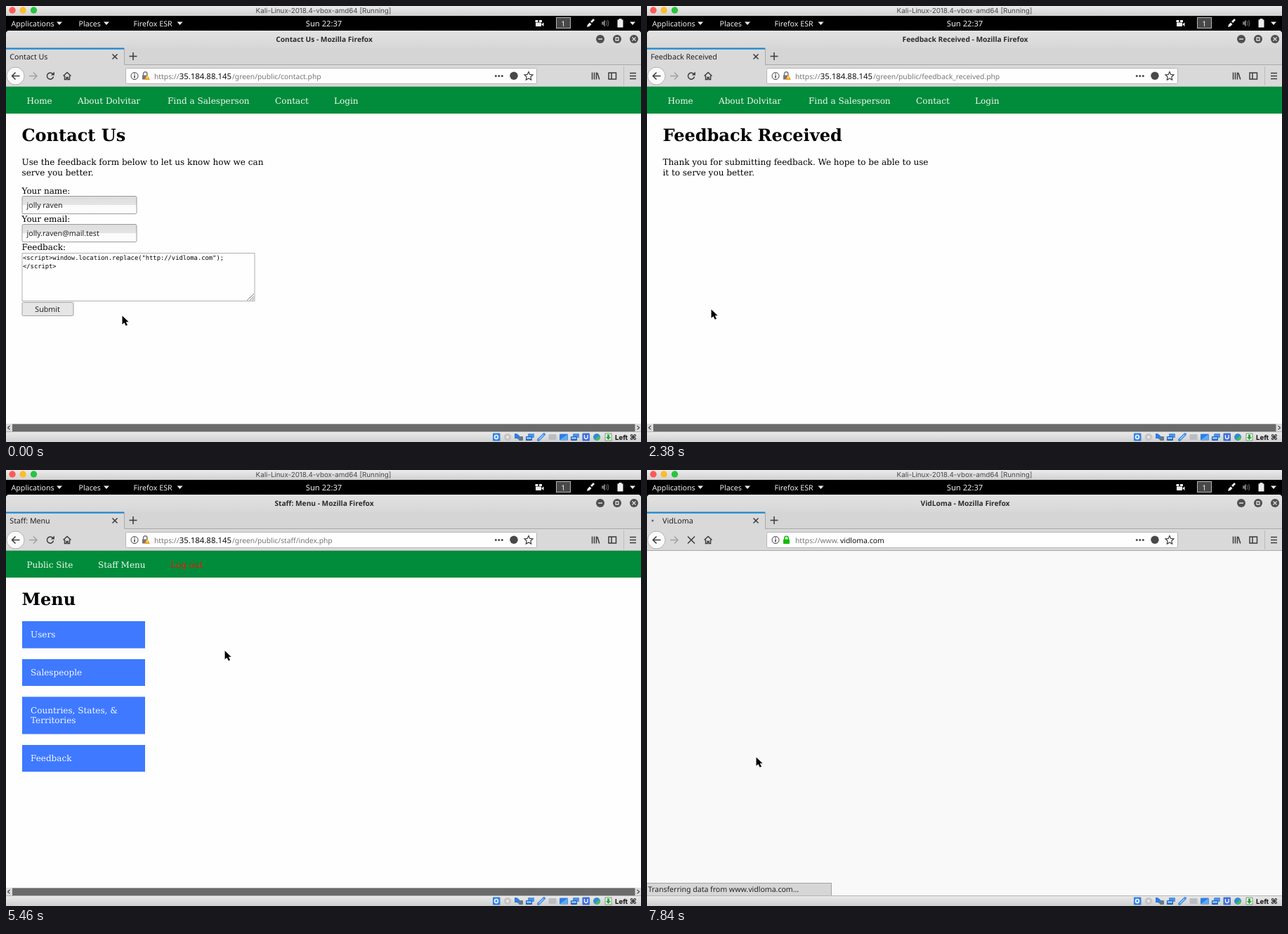
An HTML page for the animation above (7990 ms loop, 904x620 px).

```html
<!DOCTYPE html>
<html lang="en">
<head>
<meta charset="utf-8">
<title>Feedback form session</title>
<style>
  html, body { margin: 0; width: 100%; height: 100%; overflow: hidden; background: #fefefe; }
  svg { position: absolute; left: 0; top: 0; display: block; }
  text, #status { white-space: pre; text-rendering: geometricPrecision; }
  .ui { font: 10.65px "Noto Sans", "Open Sans", sans-serif; fill: #222; }
  .top { fill: #eee; }
  .title { font-size: 10.2px; font-weight: 700; fill: #2b2b2b; }
  .url { font-size: 10.3px; fill: #777; }
  .url .host { fill: #111; }
  .serif { font: 12.03px "DejaVu Serif", serif; fill: #000; }
  .head { font: bold 24px "DejaVu Serif", serif; }
  .nav { fill: #f1f7f3; }
  .mono { font: 8.8px "DejaVu Sans Mono", monospace; fill: #000; }
  .line { fill: none; stroke: #3c3c3c; stroke-width: 1.5; }
  .item rect { fill: #3e79ff; }
  .item.hover rect { fill: #2f6de8; }
  .item text { fill: #f4f7ff; }
  .off { display: none; }
  #status {
    position: absolute; left: 0; top: 587px; height: 17px;
    padding: 0 3.5px 0 1.5px; border: solid #a3a3a3; border-width: 1px 1px 0 0;
    background: #d6d6d6; color: #222; overflow: hidden;
    font: 10.55px/18px "Noto Sans", "Open Sans", sans-serif;
  }
</style>
</head>
<body>
<svg width="904" height="620" viewBox="0 0 904 620">
  <defs>
    <linearGradient id="mac" x2="0" y2="1"><stop stop-color="#ebebeb"/><stop offset="1" stop-color="#cfcfcf"/></linearGradient>
    <linearGradient id="bar" x2="0" y2="1"><stop stop-color="#e2e2e2"/><stop offset="1" stop-color="#d7d7d7"/></linearGradient>
    <linearGradient id="field" x2="0" y2="1"><stop offset=".05" stop-color="#dedede"/><stop offset=".48" stop-color="#e4e4e4"/><stop offset=".5" stop-color="#fafafa"/><stop offset="1" stop-color="#fefefe"/></linearGradient>
  </defs>

  <!-- host window title -->
  <rect width="904" height="15" fill="url(#mac)"/>
  <circle cx="9" cy="6" r="4.7" fill="#fc5b55"/>
  <circle cx="24" cy="6" r="4.7" fill="#fdbb2d"/>
  <circle cx="39.5" cy="6" r="4.7" fill="#27c63f"/>
  <text x="452" y="10" text-anchor="middle" font-family="Inter, sans-serif" font-size="9.8" fill="#484848">Kali-Linux-2018.4-vbox-amd64 [Running]</text>

  <!-- desktop panel -->
  <rect y="14" width="904" height="26" fill="#000"/>
  <g class="ui top">
    <text x="7.5" y="29">Applications</text>
    <text x="103.5" y="29">Places</text>
    <text x="181.5" y="29">Firefox ESR</text>
    <text x="426.8" y="29" font-size="11.2">Sun 22:37</text>
    <path d="M72 22.5h8l-4 4.5zM139 22.5h8l-4 4.5zM243.5 22.5h8l-4 4.5zM888 22.5h8l-4 4.5z"/>
    <path d="M754 23.5h8v5.5h-8zM762 26l3.5-2.500v5.500zM753.5 20h4v3h-4zM759 20h4v3h-4z"/>
    <rect x="783.5" y="16.5" width="20" height="15" fill="#484848" stroke="#b5b5b5"/>
    <text x="790.3" y="29">1</text>
    <path d="M827 30l1-3.5 3-3 2.5 2.5-3 3zM832 22l4-4 2 2-4 4z"/>
    <path d="M848 22.5h2l3-3v10l-3-3h-2z" fill="#777"/>
    <path d="M854.5 21.5q2 3 0 6M856.5 20q3 4.5 0 9" fill="none" stroke="#777"/>
    <path d="M870.5 19.5h2V18h4v1.5h2v11h-8z"/>
  </g>

  <!-- browser frame -->
  <path d="M0 115V40q0-5 5-5h894q5 0 5 5v75z" fill="#d9d9d9"/>
  <path d="M0 60V40q0-5 5-5h894q5 0 5 5v20z" fill="url(#bar)"/>
  <rect x="168" y="60" width="736" height="24" fill="#d5d5d5"/>
  <path d="M168.5 60v23.5H904M0 114.5h904" fill="none" stroke="#a9a9a9"/>
  <rect y="59.5" width="168" height="2.2" fill="#1688d1"/>
  <text id="title" class="ui title" x="453" y="50.5" text-anchor="middle"></text>
  <g fill="#505050">
    <circle cx="846" cy="47" r="6"/><circle cx="870" cy="47" r="6"/><circle cx="894" cy="47" r="6"/>
  </g>
  <path d="M843 47h6M868 45h4v4h-4zM891.5 44.5l5 5m0-5l-5 5" fill="none" stroke="#ddd" stroke-width="1.3"/>
  <circle id="dot" cy="72" r="1.5" fill="#666"/>
  <text id="tab" class="ui" y="76"></text>
  <path class="line" d="M151.5 68.500l7 7m0-7l-7 7M175.5 71.5h11M181 66v11"/>

  <circle cx="13.5" cy="99.5" r="12.5" fill="#fafafa" stroke="#b2b2b2"/>
  <path class="line" d="M19.5 99.5H8.5m5-5l-5 5 5 5"/>
  <path class="line" d="M33 99.5h11m-5-5l5 5-5 5" style="stroke:#a2a2a2"/>
  <g data-icon="reload"><path class="line" d="M66.5 96.5a4.6 4.6 0 1 0 1 4"/><path d="M68.8 93.5v5h-5z" fill="#3c3c3c"/></g>
  <path data-icon="ring" class="line" d="M60 103.3a4.6 4.6 0 1 1 6 0"/>
  <path data-icon="stop" class="line" d="M58 94.5l10 10m0-10l-10 10"/>
  <path class="line" d="M81.5 99.5l5.5-5 5.5 5M83.5 99v5.5h2.5v-3h2v3h2.5V99"/>

  <rect x="170.5" y="88.5" width="585" height="22" rx="2" fill="#fefefe" stroke="#b5b5b5"/>
  <circle cx="183" cy="99.5" r="5" class="line" style="stroke-width:1"/>
  <path class="line" d="M183 98.5v4M183 96v1.3"/>
  <g id="plainLock">
    <path class="line" d="M195.5 99v-2.5a2.7 2.7 0 0 1 5.4 0V99" style="stroke:#777"/>
    <rect x="194" y="98.5" width="8" height="6" fill="#777"/>
    <path d="M201 97.5l4 7.5h-8z" fill="#f2a31b"/><path d="M201 100v3" stroke="#fff"/>
  </g>
  <g id="greenLock">
    <path class="line" d="M195.8 99v-2a2.7 2.7 0 0 1 5.4 0v2" style="stroke:#12bc00"/>
    <rect x="194" y="98.5" width="9" height="6.5" rx="1" fill="#12bc00"/>
  </g>
  <text class="ui url" x="211" y="103.5" id="scheme"></text>
  <text class="ui url" y="103.5"><tspan class="host" id="host"></tspan></text>
  <text class="ui url" x="322" y="103.5" id="path"></text>
  <g fill="#484848">
    <circle cx="697.3" cy="99.5" r="1.5"/><circle cx="701.8" cy="99.5" r="1.5"/><circle cx="706.3" cy="99.5" r="1.5"/>
    <circle cx="723" cy="99.3" r="5.7"/>
  </g>
  <polygon class="line" style="stroke-width:1.2" points="744,93.5 745.8,97.4 750,97.9 746.9,100.8 747.7,105 744,102.9 740.3,105 741.1,100.8 738,97.9 742.2,97.4"/>
  <path class="line" d="M834.5 94.5v10M837.5 94.5v10M840.5 94.5v10M841.8 95l3 9.5M858 95h10.5v9H858zM862 95v9M888 95.5h9M888 99.5h9M888 103.5h9"/>
  <path d="M879.5 86v27" stroke="#bcbcbc"/>

  <!-- page -->
  <rect id="paper" y="115" width="904" height="491"/>
  <g id="site">
    <rect y="115" width="904" height="38" fill="#008c3a"/>
    <g data-pages="contact received" class="serif">
      <g class="nav">
        <text x="29.5" y="139">Home</text><text x="102" y="139">About Dolvitar</text>
        <text x="230" y="139">Find a Salesperson</text><text x="383" y="139">Contact</text><text x="467" y="139">Login</text>
      </g>
      <rect id="loginFocus" x="466.5" y="127.5" width="36" height="15" fill="none" stroke="#d8eadf" stroke-dasharray="1 1"/>
    </g>
    <g data-pages="contact" class="serif">
      <text class="head" x="22.5" y="192">Contact Us</text>
      <text x="22.5" y="226">Use the feedback form below to let us know how we can</text>
      <text x="22.5" y="241">serve you better.</text>
      <text x="22.5" y="267">Your name:</text>
      <text x="22.5" y="307">Your email:</text>
      <text x="22.5" y="347">Feedback:</text>
      <g fill="url(#field)" stroke="#9b9b9b">
        <rect x="23" y="270.5" width="163" height="25" rx="2"/><rect x="23" y="310.5" width="163" height="25" rx="2"/>
      </g>
      <text class="ui" x="29.5" y="287">jolly raven</text>
      <text class="ui" x="29.5" y="327">jolly.raven@mail.test</text>
      <rect x="23" y="351.5" width="331" height="68" fill="#fefefe" stroke="#b0b0b0"/>
      <text class="mono" x="24" y="361">&lt;script&gt;window.location.replace("http://vidloma.com");</text>
      <text class="mono" x="24" y="372.5">&lt;/script&gt;</text>
      <path d="M343 418.5l10-9M347 418.5l6-5.5M350.5 418.5l2.5-2.5" stroke="#777"/>
      <rect id="submit" x="23" y="421.5" width="73" height="19" rx="1.5" stroke="#a2a2a2"/>
      <rect id="submitFocus" x="25.5" y="423.5" width="68" height="15" fill="none" stroke="#999" stroke-dasharray="1 1"/>
      <text class="ui" x="41.3" y="435">Submit</text>
    </g>
    <g data-pages="received" class="serif">
      <text class="head" x="22.5" y="192">Feedback Received</text>
      <text x="22.5" y="226">Thank you for submitting feedback. We hope to be able to use</text>
      <text x="22.5" y="241">it to serve you better.</text>
    </g>
    <g data-pages="menu" class="serif">
      <g class="nav">
        <text x="29.5" y="139">Public Site</text><text x="131" y="139">Staff Menu</text><text x="234" y="139" fill="#f01010">Log out</text>
      </g>
      <text class="head" x="22.5" y="192">Menu</text>
      <g class="item"><rect x="23" y="215" width="175" height="38.5"/><text x="35" y="238">Users</text></g>
      <g class="item"><rect x="23" y="269" width="175" height="38"/><text x="35" y="292">Salespeople</text></g>
      <g class="item"><rect x="23" y="322.5" width="175" height="53"/><text x="35" y="346">Countries, States, &amp;</text><text x="35" y="360">Territories</text></g>
      <g class="item"><rect x="23" y="391" width="175" height="38"/><text x="35" y="414">Feedback</text></g>
      <text id="column" x="310.5" y="244" font-weight="bold">Feedback</text>
    </g>
    <rect y="594" width="904" height="11.5" fill="#dcdcdc"/>
    <rect x="9" y="594.5" width="886.5" height="10.5" fill="#6a6a6a"/>
    <path class="line" d="M5.5 597l-3 2.7 3 2.7M898.5 597l3 2.7-3 2.7" style="stroke-width:1.1"/>
  </g>

  <!-- host status bar -->
  <rect y="605" width="904" height="15" fill="url(#mac)"/>
  <path d="M0 605.5h904" stroke="#b4b4b4"/>
  <g id="devices"></g>
  <text x="867" y="617" font-family="Inter, sans-serif" font-size="9.6" font-weight="700" fill="#111">Left</text>
  <text x="888" y="617" font-family="DejaVu Sans, sans-serif" font-size="10.5" font-weight="700" fill="#111">⌘</text>
</svg>
<div id="status"></div>
<svg width="904" height="620" viewBox="0 0 904 620">
  <path id="cursor" d="M.5 .5v12.2l2.9-2.5 2.3 4.6 2.3-1-2.3-4.6h3.9z" fill="#000" stroke="#fff" stroke-width="1.2" paint-order="stroke"/>
</svg>

<script>
const LOOP = 7990, STEP = 148.5;
const $ = id => document.getElementById(id);
const all = (query, fn) => document.querySelectorAll(query).forEach(fn);
const show = (el, on) => el.classList.toggle('off', !on);

// Virtual machine device icons
const blue = '#2f7fe0', red = '#e03030';
const box = (x, y, w, h, fill) => `<rect x="${x}" y="${y}" width="${w}" height="${h}" rx="1" fill="${fill}"/>`;
const disc = (x, r, fill) => `<circle cx="${x}" cy="613" r="${r}" fill="${fill}"/>`;
const path = (d, style) => `<path d="${d}" ${style}/>`;
const screens = x => box(x - 3, 608, 9, 6, '#4b93e6') + box(x - 6, 612, 9, 6, '#1e62bd') + box(x - 5, 613, 7, 3, '#8cbcf2');
$('devices').innerHTML =
  box(693, 607.5, 10.5, 11, blue) + disc(698, 3.4, '#dcecff') + disc(698, 1.4, blue) +
  disc(714, 5.3, '#c6c6c6') + disc(714, 1.8, '#eee') +
  path('M724 608h3l4 3v6l-4-2h-3z', `fill="${blue}"`) + box(730, 612, 6, 6, '#66788c') +
  screens(746) +
  path('M758 617l8-8', 'stroke="#4b93e6" stroke-width="4" stroke-linecap="round"') + path('M759 616l6-6', 'stroke="#e4f0ff"') +
  box(772.5, 609, 11, 8, '#b9bdc2') +
  box(788, 608.5, 12, 9, blue) + path('M788.5 617l11-8v8z', 'fill="#62a9f3"') +
  screens(810) +
  box(820.5, 607.5, 10.5, 11, '#3f6fd8') + path('M823.5 610v4q2.3 3 4.6 0v-4', 'fill="none" stroke="#fff" stroke-width="1.3"') +
  disc(841, 5, '#2f8fd0') + path('M838 617l7-6v6z', 'fill="#4dc04d"') +
  box(852.5, 607.5, 10, 11, '#7aa37a') + box(853.5, 608.5, 8, 9, '#e3f1e3') + path('M856 609.5h3v3.500h2l-3.500 4-3.500-4h2z', 'fill="#2ea043"') +
  `<g id="busy">${box(742, 615, 4, 3, red) + box(747, 609, 3, 3, red) + box(700, 614, 3, 4, red)}</g>`;

// Cursor movement: [first step, number of steps, x, y]
const glides = [
  [300, 7, 91, 431], [2530, 2, 108, 402], [2820, 5, 482, 159],
  [3710, 3, 484, 140], [4880, 5, 291, 270], [6050, 6, 155, 408]
];

function cursorAt(t) {
  let x = 165, y = 440;
  for (const [start, steps, toX, toY] of glides) {
    if (t < start) break;
    const u = Math.min(1, (Math.floor((t - start) / STEP + 0.02) + 1) / steps);
    const eased = u * u * (3 - 2 * u);
    x += (toX - x) * eased;
    y += (toY - y) * eased;
  }
  return [x, y];
}

const ip = '35.184.88.145', root = '/green/public/', secure = 'https://' + ip + root;
const start = {
  page: 'contact', title: 'Contact Us', tab: 'Contact Us', path: 'contact.php', icon: 'reload',
  dot: 0, status: '', width: 0, fade: 1, focus: '', busy: false, column: false
};
const idle = { dot: 0, status: '', focus: '', busy: false, icon: 'reload' };
const video = {
  page: 'video', title: 'VidLoma', tab: 'VidLoma', icon: 'stop', width: 257, fade: 1,
  status: 'Transferring data from www.vidloma.com...', busy: false
};

// Each change adds to the state before it
const changes = [
  [1640, { focus: 'submit' }],
  [1790, { dot: 9, icon: 'ring', busy: true, status: `Performing a TLS handshake to ${ip}...` }],
  [1940, { dot: 12, icon: 'stop', status: `Waiting for ${ip}...` }],
  [2230, { ...idle, page: 'received', title: 'Feedback Received', tab: 'Feedback Received', path: 'feedback_received.php' }],
  [4000, { status: secure + 'staff/index.php' }],
  [4290, { focus: 'login' }],
  [4440, { dot: 6.5, busy: true }],
  [4590, { ...idle, page: 'menu', title: 'Staff: Menu', tab: 'Staff: Menu', path: 'staff/index.php' }],
  [6790, { status: secure + 'staff/feedback/index.php' }],
  [7240, { dot: 5, busy: true }],
  [7390, { dot: 6.5, title: 'Staff: Feedback', path: 'staff/feedback/index.php', column: true, width: 258, fade: 0.6 }],
  [7540, { dot: 9, icon: 'stop', fade: 1, status: 'Waiting for www.vidloma.com...', width: 0 }],
  [7690, { ...video, dot: 5 }],
  [7840, { dot: 8 }]
];
let last = start;
const states = [[0, start], ...changes.map(([t, change]) => [t, last = { ...last, ...change }])];

function showState(s) {
  const away = s.page === 'video';
  $('title').textContent = s.title + ' - Mozilla Firefox';
  $('tab').textContent = s.tab;
  $('tab').setAttribute('x', s.dot ? 22 : 5.3);
  $('dot').setAttribute('cx', s.dot);
  show($('dot'), s.dot);
  $('scheme').textContent = away ? 'https://www.' : 'https://';
  $('host').textContent = away ? 'vidloma.com' : ip;
  $('host').setAttribute('x', away ? 275 : 246.7);
  $('host').style.fontSize = away ? '10.4px' : '11.4px';
  $('path').textContent = away ? '' : root + s.path;
  show($('plainLock'), !away);
  show($('greenLock'), away);
  show($('site'), !away);
  $('paper').setAttribute('fill', away ? '#f9f9f9' : '#fefefe');
  all('[data-pages]', el => show(el, el.dataset.pages.split(' ').includes(s.page)));
  all('[data-icon]', el => show(el, el.dataset.icon === s.icon));
  show($('submitFocus'), s.focus === 'submit');
  show($('loginFocus'), s.focus === 'login');
  show($('column'), s.column);
  show($('busy'), s.busy);
  const status = $('status');
  show(status, s.status);
  status.textContent = s.status;
  status.style.width = s.width ? s.width + 'px' : 'auto';
  status.style.opacity = s.fade;
}

const inside = (rect, x, y) => {
  const { x: left, y: top, width, height } = rect.getBBox();
  return x >= left && x <= left + width && y >= top && y <= top + height;
};

let shown;
function draw(now) {
  const t = now % LOOP;
  const state = states.findLast(([time]) => time <= t)[1];
  if (state !== shown) showState(shown = state);
  const [x, y] = cursorAt(t);
  $('cursor').setAttribute('transform', `translate(${x} ${y})`);
  all('.item', el => el.classList.toggle('hover', inside(el.firstElementChild, x, y)));
  $('submit').setAttribute('fill', inside($('submit'), x, y) ? '#f5f5f5' : '#e6e6e6');
}

const began = performance.now();
function tick() {
  draw(performance.now() - began);
  requestAnimationFrame(tick);
}
tick();
</script>
</body>
</html>
```
